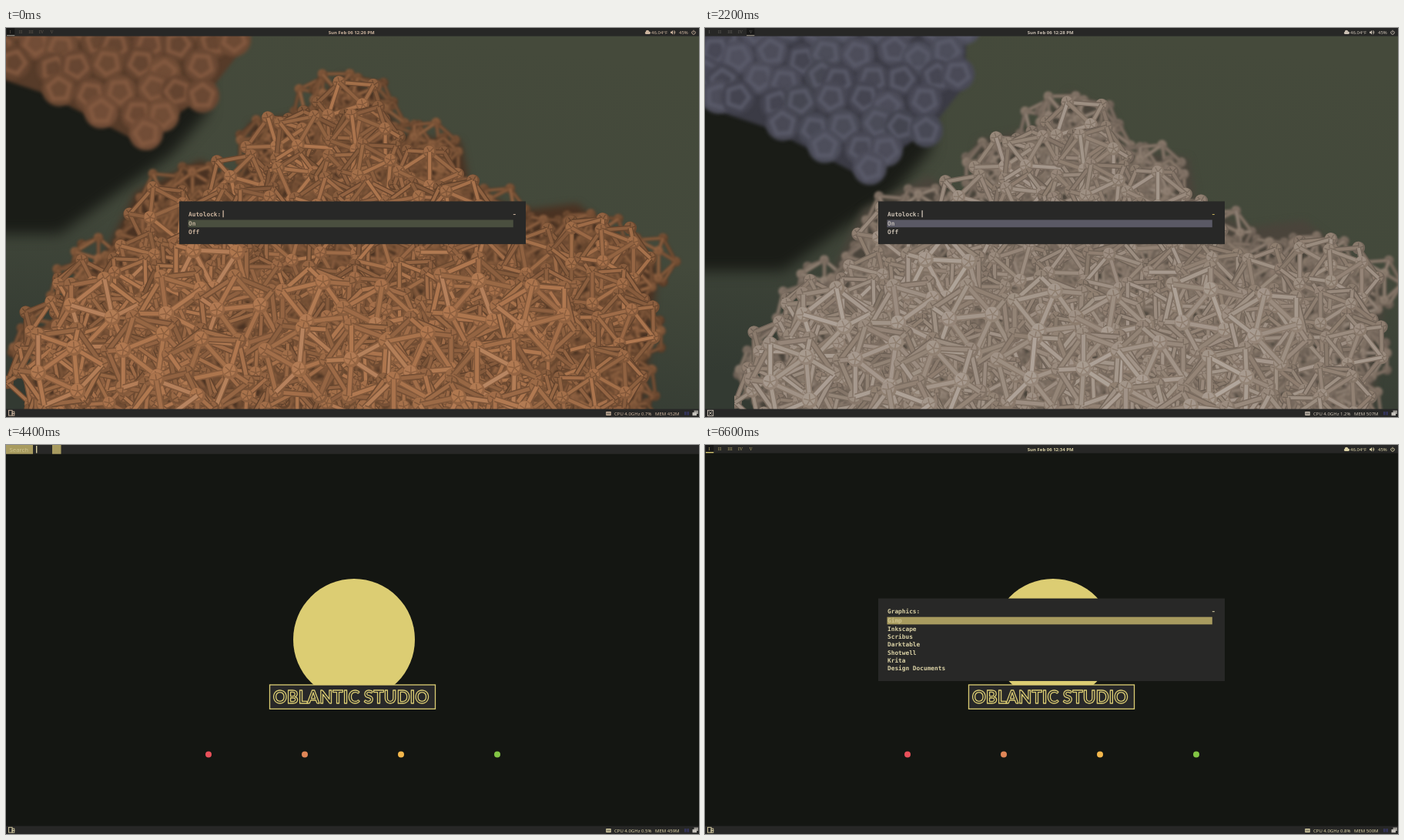
Write an HTML page with a canvas that moves like this. It is 900 px wide and 506 px high and loops after 7700 ms.

```html
<!DOCTYPE html>
<html lang="en">
<head>
<meta charset="utf-8">
<title>Desktop menus</title>
<style>
  html, body { margin: 0; height: 100%; overflow: hidden; background: #141612; }
  canvas { display: block; }
</style>
</head>
<body>
<canvas id="stage" width="900" height="506"></canvas>
<script>
const W = 900, H = 506, TAU = Math.PI * 2, HOLD = 1100;
const ctx = document.getElementById('stage').getContext('2d');

function layer(paint) {
  const c = document.createElement('canvas');
  c.width = W; c.height = H;
  paint(c.getContext('2d'));
  return c;
}
function seeded(seed) {
  return () => (seed = (seed * 16807) % 2147483647) / 2147483647;
}
function disc(g, x, y, r, fill) {
  g.beginPath(); g.arc(x, y, r, 0, TAU);
  g.fillStyle = fill; g.fill();
}
function polygon(pts) {
  const p = new Path2D();
  for (let i = 0; i < pts.length; i += 2) p.lineTo(pts[i], pts[i + 1]);
  p.closePath();
  return p;
}
// Visits the centres of a jittered, staggered grid
function scatter(gap, seed, visit) {
  const rand = seeded(seed);
  for (let row = 0; row * gap * .8 < H + gap; row++)
    for (let x = (row % 2) * gap / 2; x < W; x += gap)
      visit(x + (rand() - .5) * gap * .5, row * gap * .8 + (rand() - .5) * gap * .4, rand);
}

// ---- Ball-and-stick wallpaper ----
const pile = polygon([0, 520, 10, 420, 60, 335, 110, 280, 150, 200, 240, 155, 295, 185, 308, 105, 385, 90,
  437, 38, 495, 70, 515, 120, 600, 130, 612, 190, 680, 225, 760, 215, 872, 300, 850, 520]);
const farMass = polygon([-40, -50, 308, -50, 305, 30, 262, 85, 172, 148, 50, 85, -40, 55]);
const depths = [
  { gap: 38, r: 34, blur: 1.5, light: -8, dx: 35, dy: 29, inside: () => true },
  { gap: 62, r: 45, blur: .7, light: -3, dx: 38, dy: 26, inside: () => true },
  { gap: 92, r: 54, blur: 0, light: 1, dx: 43, dy: 12, inside: (x, y) => y > 310 && x < 720 }
];
const corners = [];
for (const a of [-1, 1]) for (const b of [-1.618, 1.618])
  corners.push([0, a, b], [a, b, 0], [b, 0, a]);

// Icosahedron of sticks and balls, drawn from back to front
function cluster(g, x, y, r, tone, light, rand) {
  const spin = rand() * TAU, tilt = rand() * TAU, parts = [];
  const nodes = corners.map(([a, b, c]) => {
    const u = a * Math.cos(spin) - b * Math.sin(spin), v = a * Math.sin(spin) + b * Math.cos(spin);
    return { x: x + u * r / 1.9, y: y + (v * Math.cos(tilt) - c * Math.sin(tilt)) * r / 1.9,
      z: (v * Math.sin(tilt) + c * Math.cos(tilt)) / 1.9 };
  }).filter(n => n.z > -.5);
  const shade = l => `hsl(${tone.hue} ${tone.sat}% ${l}%)`;
  const stroke = (p, q, width, l) => {
    g.beginPath(); g.moveTo(p.x, p.y); g.lineTo(q.x, q.y);
    g.lineWidth = width; g.strokeStyle = shade(l); g.stroke();
  };
  nodes.forEach((p, i) => {
    const l = light + p.z * 8, size = r * .19;
    parts.push([p.z + .1, () => {
      disc(g, p.x, p.y, size, shade(l - 7));
      disc(g, p.x - size * .1, p.y - size * .15, size * .8, shade(l + 1));
      for (let k = 0; k < 5; k++) {
        const a = spin + k * TAU / 5;
        stroke(p, { x: p.x + Math.cos(a) * size * .8, y: p.y + Math.sin(a) * size * .8 }, size * .14, l - 9);
      }
    }]);
    for (const q of nodes.slice(i + 1)) {
      if (Math.hypot(p.x - q.x, p.y - q.y, (p.z - q.z) * r) > r * 1.1) continue;
      const z = (p.z + q.z) / 2, gloss = rand() * 10 - 4;
      parts.push([z, () => {
        stroke(p, q, r * .15, light + z * 8 - 11);
        stroke(p, q, r * .09, light + z * 8 + gloss);
      }]);
    }
  });
  parts.sort((a, b) => a[0] - b[0]).forEach(part => part[1]());
}

function latticeScene(tone, moved) {
  return layer(g => {
    const addLayer = (blur, dx, dy, paint) => {
      g.filter = blur ? `blur(${blur}px)` : 'none';
      g.drawImage(layer(paint), moved * dx, moved * dy);
    };
    const sky = g.createLinearGradient(500, 0, 430, H);
    sky.addColorStop(0, '#454a3b');
    sky.addColorStop(.5, '#43493b');
    sky.addColorStop(1, '#333a32');
    g.fillStyle = sky; g.fillRect(0, 0, W, H);

    g.filter = 'blur(9px)';
    g.translate(moved * 32, moved * 48);
    g.fillStyle = '#1a1c17';
    g.fill(polygon([-90, 20, 260, 60, 262, 110, 215, 165, 130, 225, 70, 268, -90, 268]));
    g.resetTransform();

    // Far, out-of-focus lumps with pentagon faces
    g.filter = 'blur(2px)';
    g.translate(moved * 32, moved * 45);
    const farShade = l => `hsl(${tone.farHue} ${tone.farSat}% ${l}%)`;
    g.fillStyle = farShade(25); g.fill(farMass);
    scatter(38, 5, (x, y, rand) => {
      x -= 40; y -= 40;
      const turn = rand() * TAU;
      if (!layerTest.isPointInPath(farMass, x, y)) return;
      disc(g, x, y, 22, farShade(29 + rand() * 5));
      g.beginPath();
      for (let i = 0; i < 5; i++) {
        const a = turn + i * TAU / 5;
        g.lineTo(x + 15 * Math.cos(a), y + 15 * Math.sin(a));
      }
      g.closePath();
      g.lineWidth = 4.5; g.strokeStyle = farShade(39); g.stroke();
    });
    g.resetTransform();

    addLayer(5, 37, 22, f => {
      f.translate(27, 24); f.scale(.94, .95);
      f.fillStyle = tone.gap; f.fill(pile);
    });
    depths.forEach((d, i) => addLayer(d.blur, d.dx, d.dy, f =>
      scatter(d.gap, 31 + i, (x, y, rand) => {
        const spots = [[x, y - d.r * .8], [x - d.r * .8, y], [x + d.r * .8, y]];
        if (d.inside(x, y) && spots.every(s => layerTest.isPointInPath(pile, ...s)))
          cluster(f, x, y, d.r, tone, tone.light + d.light, rand);
      })));
  });
}
const layerTest = document.createElement('canvas').getContext('2d');

// ---- Planet wallpaper ----
function noise(x, y) {
  const i = Math.floor(x), j = Math.floor(y), ease = t => t * t * (3 - 2 * t);
  const hash = (a, b) => { const s = Math.sin(a * 127.1 + b * 311.7) * 43758.5453; return s - Math.floor(s); };
  const mix = (a, b, t) => a + (b - a) * t, u = ease(x - i), v = ease(y - j);
  return mix(mix(hash(i, j), hash(i + 1, j), u), mix(hash(i, j + 1), hash(i + 1, j + 1), u), v);
}
function clouds(x, y) {
  let sum = 0;
  for (let k = 1; k <= 8; k *= 2) sum += noise(x * k, y * k) / k;
  return sum / 1.875;
}
function planetColour(x, y) {
  const bend = clouds(x / 90, y / 90), swirl = clouds(x / 60 + bend * 3, y / 60 - bend * 2);
  const near = (cx, cy, rx, ry) => 1 - Math.hypot((x - cx) / rx, (y - cy) / ry);
  const sea = Math.max(near(560, 130, 145, 115), near(550, 382, 75, 48), near(350, 375, 80, 60)) + (swirl - .5) * 1.5;
  let c;
  if (sea > .1) {
    c = clouds(x / 75 + 9, y / 55 + bend * 2) > .52 ? [80, 70, 88] : [80, 103, 112];
    const wisp = Math.max(0, clouds(x / 60 + y / 90, y / 14 - x / 28) - .56) * 2.2;
    c = c.map(v => v + wisp * 90);
  } else {
    const west = Math.min(1, Math.max(0, (500 - x) / 120));
    const fold = Math.sin(swirl * 34) * .5 + .5;
    c = [186, 162, 138].map((v, i) => v * (1 - west * fold * (.16 + i * .04)) - (sea > .04 ? 22 : 0));
    if (swirl < .42) c = c.map(v => v * (1 - west * .55));
  }
  const t = Math.min(1, Math.max(0, (x - 295 + (bend - .5) * 60) / 165));
  const day = t * t * (3 - 2 * t);
  return c.map(v => v * day);
}
const planet = layer(g => {
  g.fillStyle = '#020302'; g.fillRect(0, 0, W, H);
  const dusk = g.createLinearGradient(270, 0, 480, 0);
  dusk.addColorStop(0, '#020302');
  dusk.addColorStop(1, '#202726');
  disc(g, 462, 237, 213, dusk);
  disc(g, 461, 237, 205, g.createPattern(layer(f => {
    const img = f.createImageData(W, H);
    for (let y = 30; y < 444; y++) for (let x = 254; x < 668; x++)
      img.data.set([...planetColour(x, y), 255], (y * W + x) * 4);
    f.putImageData(img, 0, 0);
  }), 'no-repeat'));
});

// ---- Dark wallpaper with name plate ----
const plate = layer(g => {
  const gold = '#dccd73';
  g.fillStyle = '#141612'; g.fillRect(0, 0, W, H);
  disc(g, 452, 253, 79, gold);
  g.fillStyle = '#282828'; g.fillRect(342.5, 312, 215, 31.3);
  g.strokeStyle = gold; g.lineWidth = 1.3;
  g.strokeRect(342.5, 312, 215, 31.3);
  g.font = '700 22.5px Lato, sans-serif';
  g.textAlign = 'center';
  g.lineJoin = 'round';
  g.strokeText('OBLANTIC STUDIO', 448, 335.5);
  ['#e9505a', '#e08657', '#f4b74c', '#82c544'].forEach((c, i) => disc(g, 263 + i * 125, 402.5, 4, c));
});

const warm = latticeScene({ hue: 25, sat: 38, light: 42, gap: '#4a3222', farHue: 23, farSat: 35 }, 0);
const pale = latticeScene({ hue: 28, sat: 12, light: 52, gap: '#4a443b', farHue: 238, farSat: 8 }, 1);

// ---- Panels and menus ----
const looks = {
  warm: { wall: warm, ink: '#cdb59f', dim: '#5b534a', pick: '#4a4f3f', picked: '#bcae97', mark: '#8b857c' },
  pale: { wall: pale, ink: '#cbc1b4', dim: '#5b5955', pick: '#5a5965', picked: '#bdb7b2', mark: '#8b857c', dash: '#c9b45c' },
  planet: { wall: planet, ink: '#d2c8bb', dim: '#77736c', pick: '#73858b', picked: '#c4c6c3', mark: '#8b857c' },
  gold: { wall: plate, ink: '#dbd2a6', dim: '#a5985f', pick: '#a89b5f', picked: '#cdc28d', mark: '#d1c36f' }
};
const screens = [
  { look: 'warm', time: '12:26', cpu: .7, mem: 452, prompt: 'Autolock:', cursor: true, bold: true, items: ['On', 'Off'] },
  { look: 'planet', time: '12:27', cpu: .7, mem: 627, lit: 4, prompt: 'Games:', cursor: true, bold: true,
    items: ['Tarbo', 'Lutris', 'DosBox', 'Retro Arch'] },
  { look: 'pale', time: '12:28', cpu: 1.2, mem: 507, active: 4, prompt: 'Autolock:', cursor: true, bold: true, items: ['On', 'Off'] },
  { look: 'warm', time: '12:34', cpu: .7, mem: 495, prompt: 'Calendar:', items: ['Sync', 'Sync & Browse', 'Browse'] },
  { look: 'gold', search: true, cpu: .5, mem: 459 },
  { look: 'warm', time: '12:35', cpu: .7, mem: 503, prompt: 'Timers:', cursor: true,
    items: ['30 seconds', '60 seconds', '10 Minutes', '30 Minutes', '1 Hour'] },
  { look: 'gold', time: '12:34', cpu: .8, mem: 500, prompt: 'Graphics:', bold: true,
    items: ['Gimp', 'Inkscape', 'Scribus', 'Darktable', 'Shotwell', 'Krita', 'Design Documents'] }
];
const SANS = '"Noto Sans", sans-serif';

function box(x, y, w, h, fill) { ctx.fillStyle = fill; ctx.fillRect(x, y, w, h); }
function text(s, x, y, font, fill, align = 'left') {
  ctx.font = font; ctx.fillStyle = fill; ctx.textAlign = align;
  ctx.fillText(s, x, y);
}
function line(colour, ...pts) {
  ctx.beginPath();
  for (let i = 0; i < pts.length; i += 2) ctx.lineTo(pts[i], pts[i + 1]);
  ctx.lineWidth = .9; ctx.strokeStyle = colour; ctx.stroke();
}
function arc(x, y, r, from, to, colour) {
  ctx.beginPath(); ctx.arc(x, y, r, from, to);
  ctx.lineWidth = .9; ctx.strokeStyle = colour; ctx.stroke();
}

function topBar({ time, active = 0, lit }, { ink, dim, mark }) {
  box(0, 0, W, 10.6, '#272726');
  const tab = active ? 54 : 1;
  box(tab, 0, 10.3, 10.6, '#181817');
  box(tab, 9, 10.3, 1.4, mark);
  ['I', 'II', 'III', 'IV', 'V'].forEach((s, i) =>
    text(s, 5.5 + i * 13.5, 7.2, '6px "Noto Serif", serif', i === lit ? ink : dim, 'center'));
  text(`Sun Feb 06 ${time} PM`, 448.7, 7.9, `bold 6px ${SANS}`, ink, 'center');
  disc(ctx, 833, 5, 2.2, ink); disc(ctx, 831.5, 6.4, 1.6, ink); disc(ctx, 835.3, 6.3, 1.7, ink);
  box(831.5, 6, 4, 2, ink);
  text('46.04°F', 838, 7.9, `6px ${SANS}`, ink);
  ctx.fill(polygon([863, 4.7, 864.3, 4.7, 866, 3, 866, 8.4, 864.3, 6.8, 863, 6.8]));
  arc(866, 5.7, 1.5, -1, 1, ink); arc(866, 5.7, 2.9, -1, 1, ink);
  text('45%', 874, 7.9, `6px ${SANS}`, ink);
  arc(893, 5.9, 2.3, -.9, 4.04, ink);
  line(ink, 893, 2.7, 893, 5.8);
}

function searchBar({ ink, pick, picked }) {
  box(0, 0, W, 11.7, '#282827');
  box(0, 0, 35, 11.7, pick);
  text('Search', 4.5, 8.8, `7.8px ${SANS}`, picked);
  box(39, 1, 1.4, 9.5, ink);
  box(60, 0, 11.5, 11.7, pick);
}

function bottomBar({ cpu, mem }, { ink }, crossed) {
  box(0, 495.6, W, 10.4, '#272726');
  ctx.lineWidth = .9; ctx.strokeStyle = ink;
  if (crossed) {
    ctx.strokeRect(3.5, 497.3, 7.2, 7.2);
    line(ink, 5, 498.8, 9.2, 503); line(ink, 9.2, 498.8, 5, 503);
  } else {
    ctx.strokeRect(3.5, 497.3, 4.6, 6.8);
    ctx.strokeRect(8.1, 499, 2.7, 2.5);
    ctx.strokeRect(8.1, 501.5, 2.7, 2.6);
  }
  box(779.3, 499, 6.4, 5, ink);
  for (let i = 0; i < 3; i++) box(780.2, 500 + i * 1.3, 4.6, .4, '#272726');
  text(`CPU 4.0GHz ${cpu.toFixed(1)}%`, 790, 503.7, `6px ${SANS}`, ink);
  text(`MEM ${mem}M`, 843, 503.7, `6px ${SANS}`, ink);
  box(881, 499, 2.6, 4.5, '#34345a'); box(884.4, 499, 2.6, 4.5, '#34345a');
  box(893.5, 497.5, 5.5, 4.5, '#9a9791');
  box(891.5, 500, 5.5, 4.2, '#c5c2bc');
}

function menu({ prompt, items, cursor, bold }, { ink, pick, picked, dash }) {
  const step = 10.35, height = 35 + step * items.length, top = 253.3 - height / 2;
  const font = `${bold ? 'bold ' : ''}7.8px "DejaVu Sans Mono", monospace`;
  box(225, top, 450, height, '#282827');
  text(prompt, 237, top + 19.3, font, ink);
  if (cursor) box(237 + ctx.measureText(prompt).width + 2.2, top + 11.8, 1.3, 9, ink);
  box(658.8, top + 16.6, 3, 1, dash || ink);
  box(236.5, top + 24.1, 422.3, 9.7, pick);
  items.forEach((s, i) => text(s, 237, top + 31.8 + i * step, font, i ? ink : picked));
}

function draw() {
  const screen = screens[Math.floor(performance.now() / HOLD) % screens.length];
  const look = looks[screen.look];
  ctx.drawImage(look.wall, 0, 0);
  if (screen.search) searchBar(look);
  else {
    topBar(screen, look);
    menu(screen, look);
  }
  bottomBar(screen, look, screen.look === 'pale');
  requestAnimationFrame(draw);
}
draw();
</script>
</body>
</html>
```
